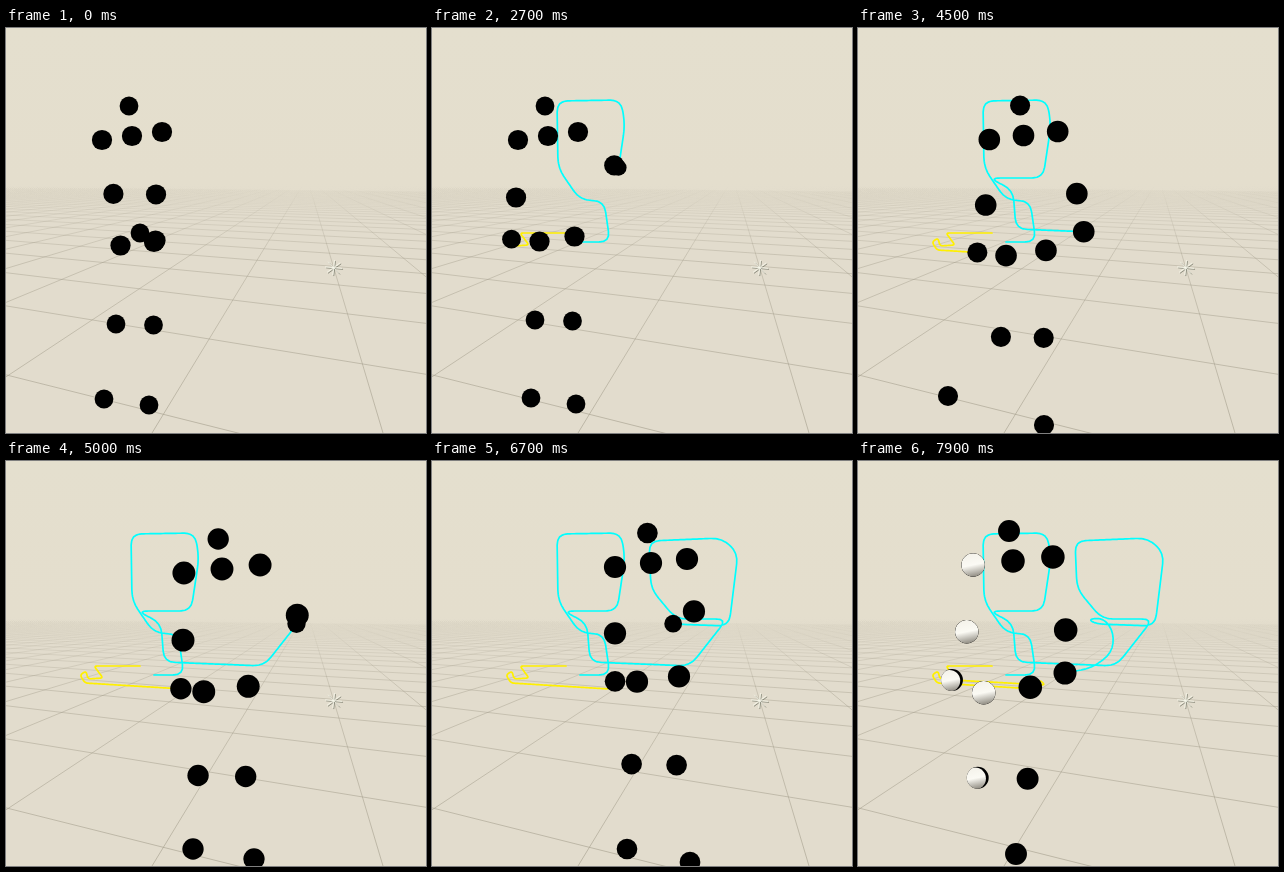
Write an HTML page with a canvas that moves like this. It is 420 px wide and 405 px high and loops after 8000 ms.

```html
<!DOCTYPE html>
<html lang="en">
<head>
<meta charset="utf-8">
<title>Motion capture</title>
<style>
html, body { margin: 0; width: 100%; height: 100%; overflow: hidden; background: #e3ddcd; }
canvas { display: block; }
</style>
</head>
<body>
<canvas id="stage" width="420" height="405"></canvas>
<script>
const W = 420, H = 405, LOOP = 8000, STEP = 100;
const ctx = document.getElementById('stage').getContext('2d');

const clamp = u => Math.min(1, Math.max(0, u));
const smooth = u => u * u * (3 - 2 * u);
const mix = (a, b, u) => a.map((v, i) => v + (b[i] - v) * u);

// Rows are [time, ...values]; returns time => values.
function track(rows, ease = u => u) {
  return time => {
    let i = 0;
    while (i < rows.length - 2 && time > rows[i + 1][0]) i++;
    const [t0] = rows[i], [t1] = rows[i + 1];
    return mix(rows[i], rows[i + 1], ease(clamp((time - t0) / (t1 - t0)))).slice(1);
  };
}

// Cuts each corner of a timed polyline with a short quadratic curve.
function rounded(rows, radius) {
  const out = [rows[0]];
  for (let i = 1; i < rows.length - 1; i++) {
    const p = rows[i];
    const [a, b] = [rows[i - 1], rows[i + 1]].map(q =>
      mix(p, q, Math.min(.5, radius / Math.hypot(q[1] - p[1], q[2] - p[2]))));
    for (let u = 0; u <= 1; u += .25) out.push(mix(mix(a, p, u), mix(p, b, u), u));
  }
  out.push(rows[rows.length - 1]);
  return out;
}

// time, neck x/y, hip centre x/y, width factor
const body = track([
  [0, 126, 108, 132, 215, 1],
  [1400, 126, 108, 131, 214, 1],
  [2700, 116, 108, 125, 211, 1],
  [4000, 115, 107, 116, 222, 1.01],
  [5000, 216, 108, 220, 228, 1.27],
  [6700, 219, 102, 226, 218, 1.2],
  [7900, 155, 100, 149, 229, 1.33]
], smooth);

const footL = track([
  [0, 98, 371], [2700, 99, 370], [4000, 90, 368], [4500, 90, 368],
  [5000, 187, 388], [6700, 195, 388], [7900, 112, 422]
], smooth);
const footR = track([
  [0, 143, 377], [2700, 144, 376], [4000, 124, 396],
  [5000, 248, 398], [6700, 258, 401], [7900, 158, 393]
], smooth);

// The right hand draws two glasses in the air.
const handR = track(rounded([
  [0, 148, 214], [850, 178, 214], [1400, 172, 173], [1550, 148, 172], [1750, 126, 140],
  [2050, 125, 73], [2350, 189, 72], [2450, 193, 97], [2760, 185, 150], [3150, 131, 150],
  [3550, 155, 162], [4080, 158, 201], [4700, 258, 205], [5030, 295, 158], [5330, 244, 158],
  [5520, 219, 128], [5750, 217, 80], [6100, 290, 77], [6250, 306, 92], [6530, 297, 165],
  [6700, 238, 163], [6820, 230, 158], [7000, 246, 157], [7200, 256, 172], [7450, 254, 192],
  [7700, 234, 207], [7900, 207, 212]
], 11));
const handL = track(rounded([
  [0, 134, 205], [900, 88, 205], [1400, 97, 217], [1800, 82, 218], [2700, 80, 210],
  [3400, 74, 214], [4150, 79, 222], [5000, 177, 228], [6700, 182, 219],
  [6850, 187, 224], [7900, 94, 219]
], 3));

// Every ball as { p, r, lag }; a ball with a lag turns towards the light.
function joints(time) {
  const [nx, ny, hx, hy, w] = body(time);
  const r = 10.1 * (1 + (w - 1) * .5), small = r * .93;
  const fromNeck = (x, y) => [nx + x * w, ny + y];
  const fromHip = (x, y) => [hx + x * w, hy + y * (1 + (w - 1) / 4)];
  const shL = fromNeck(-30, 4), shR = fromNeck(30, -4);
  const hL = handL(time), hR = handR(time);

  const elL = [shL[0] + (hL[0] - shL[0]) * .3, shL[1] + (hL[1] - shL[1]) * .58];
  const reach = Math.hypot(hR[0] - shR[0], hR[1] - shR[1]);
  const bend = (105 * w - reach) * .25;
  const elR = mix(shR, hR, .58).map(v => v + bend);
  const handSize = .8 + .2 * clamp((reach / w - 70) / 20);

  return [
    { p: fromNeck(-3, -30), r: small },
    { p: [nx, ny], r },
    { p: shL, r, lag: 0 },
    { p: shR, r },
    { p: elL, r, lag: 0 },
    { p: elR, r },
    { p: fromHip(-17.5, 2.5), r, lag: 0 },
    { p: fromHip(17.5, -2.5), r },
    { p: fromHip(-22, 81), r: small, lag: 300 },
    { p: fromHip(15.5, 82), r: small },
    { p: footL(time), r: small },
    { p: footR(time), r: small },
    { p: hR, r: r * handSize },
    { p: hL, r: small, lag: 300 }
  ];
}

function line(c, x0, y0, x1, y1) {
  c.beginPath();
  c.moveTo(x0, y0);
  c.lineTo(x1, y1);
  c.stroke();
}

function makeFloor() {
  const horizon = 150, vanishR = 301, vanishL = -785;
  const cv = document.createElement('canvas');
  cv.width = W;
  cv.height = H;
  const c = cv.getContext('2d');
  const bg = c.createLinearGradient(0, 0, 0, H);
  bg.addColorStop(0, '#e4dfce');
  bg.addColorStop(.38, '#e4decd');
  bg.addColorStop(.46, '#e2dccd');
  c.fillStyle = bg;
  c.fillRect(0, 0, W, H);

  const ink = c.createLinearGradient(0, 158, 0, H);
  [[0, 0], [.04, .06], [.12, .2], [.3, .45], [1, .65]].forEach(([p, a]) =>
    ink.addColorStop(p, `rgba(160,154,136,${a})`));
  c.strokeStyle = ink;
  c.lineWidth = .9;
  for (let k = -40; k <= 40; k++) line(c, vanishR, horizon, 377 + 231 * k, H);
  for (let k = 0; k < 40; k++) {
    const drop = 1 / (.00508 + .00274 * k);
    line(c, 0, horizon + drop, W, horizon + drop * (1 - W / vanishL));
  }
  drawMarker(c, 328, 240);
  return cv;
}

function drawMarker(c, x, y) {
  c.lineWidth = .9;
  for (const [style, off] of [['#858678', .6], ['#f6f6ea', -.4]]) {
    c.strokeStyle = style;
    for (let i = 0; i < 4; i++) {
      const a = i * Math.PI / 4 + .1, dx = 8.5 * Math.cos(a), dy = 7.5 * Math.sin(a);
      line(c, x - dx + off, y - dy + off, x + dx + off, y + dy + off);
    }
  }
}

function drawTrail(at, time, color) {
  ctx.beginPath();
  for (let t = 0; t <= time; t += 10) ctx.lineTo(...at(t));
  ctx.strokeStyle = color;
  ctx.lineWidth = 1.7;
  ctx.lineJoin = ctx.lineCap = 'round';
  ctx.stroke();
}

function disc(x, y, r, fill) {
  ctx.beginPath();
  ctx.arc(x, y, r, 0, 2 * Math.PI);
  ctx.fillStyle = fill;
  ctx.fill();
}

function drawJoint({ p: [x, y], r, lag }, time) {
  disc(x, y, r, '#000');
  const lit = clamp((time - 7250 - lag) / 400);
  if (!(lit > 0)) return;
  const shade = ctx.createLinearGradient(x - r * .2, y - r, x + r * .2, y + r);
  shade.addColorStop(0, '#f4f2ea');
  shade.addColorStop(.5, '#fbfaf4');
  shade.addColorStop(1, '#8d897f');
  const off = 2 * r * (1 - lit);
  ctx.save();
  ctx.beginPath();
  ctx.arc(x, y, r, 0, 2 * Math.PI);
  ctx.clip();
  disc(x - off, y + off * .3, r, shade);
  ctx.restore();
}

const floor = makeFloor();

function draw(time) {
  ctx.drawImage(floor, 0, 0);
  drawTrail(handL, time, '#fff000');
  drawTrail(handR, time, '#00ffff');
  joints(time).forEach(j => drawJoint(j, time));
}

const origin = performance.now();
function tick() {
  const time = (performance.now() - origin) % LOOP;
  draw(Math.floor(time / STEP) * STEP);
  requestAnimationFrame(tick);
}
tick();
</script>
</body>
</html>
```
